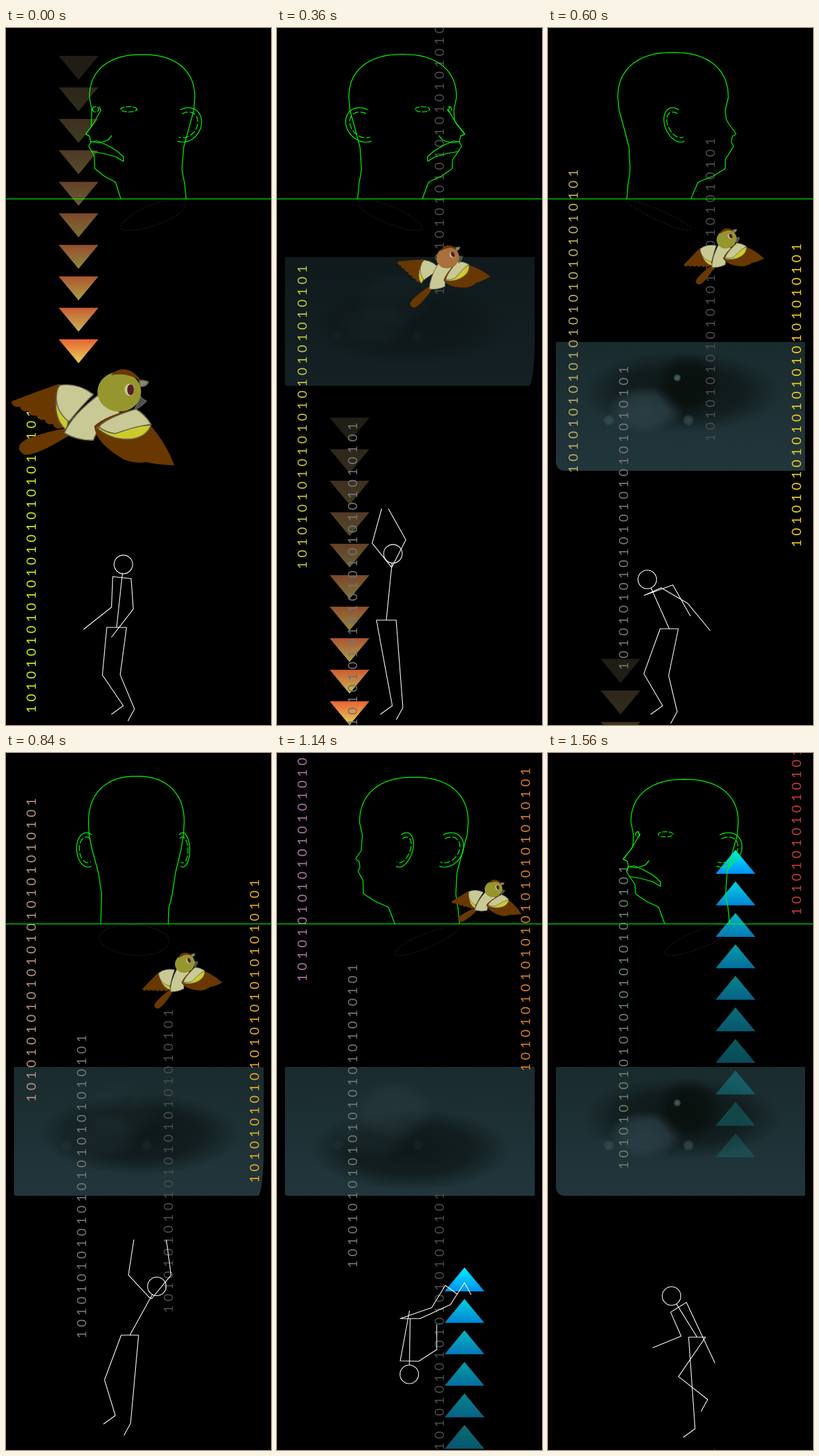
Animation of 400x1050 px, one loop 1.62 s. Source, as an HTML page with a canvas:

```html
<!DOCTYPE html>
<html lang="en">
<head>
<meta charset="utf-8">
<title>Turning head, bird and figure</title>
<style>
html, body { margin: 0; width: 100%; height: 100%; overflow: hidden; background: #000; }
canvas { display: block; }
</style>
</head>
<body>
<canvas id="stage" width="400" height="1050"></canvas>
<script>
const ctx = document.getElementById('stage').getContext('2d');
const STEP = 60, STEPS = 27, RAD = Math.PI / 180;

const mix = (a, b, f) => a + (b - a) * f;
const mixAll = (a, b, f) => a.map((v, i) => mix(v, b[i], f));
const clamp = (v, lo = 0, hi = 1) => Math.min(hi, Math.max(lo, v));
const rgb = c => `rgb(${c.map(Math.round)})`;

// Linear interpolation in rows of [position, ...values]
function lookup(rows, at) {
  let i = 0;
  while (i < rows.length - 2 && rows[i + 1][0] < at) i++;
  const a = rows[i], b = rows[i + 1];
  return mixAll(a, b, clamp((at - a[0]) / (b[0] - a[0]))).slice(1);
}

function line(points) {
  ctx.beginPath();
  points.forEach(([x, y]) => ctx.lineTo(x, y));
  ctx.stroke();
}

// ---- Head: a solid of elliptic slices turned about a vertical axis ----
const AXIS = 198, BROW = 105, NECK = 257;
const YAW = [[0, -48], [6, 56], [10, 112], [14, 173], [19, 240], [22, 280], [26, 305], [27, 312]];
// height, front, back, half width
const FACE = [[105, 75, -95, 72], [124, 70, -93, 71], [145, 73, -87, 67], [180, 72, -78, 58],
  [212, 72, -77, 53], [224, 50, -78, 52], [232, 27, -79, 51], [257, 15, -81, 51]];
// height, depth of the face's middle line
const PROFILE = [[112, 76], [124, 70], [145, 84], [160, 97], [163, 90], [172, 88], [178, 92],
  [185, 87], [192, 82], [203, 73], [212, 74]];

function drawHead(n) {
  const yaw = lookup(YAW, n)[0] * RAD, sin = Math.sin(yaw), cos = Math.cos(yaw);
  const depth = (out, z) => z * cos - out * sin;
  const project = ([out, y, z]) => [AXIS + (out * cos + z * sin) / (1 - depth(out, z) / 900), y];
  const stroke3d = (points, side = 1) => line(points.map(([o, y, z]) => project([o * side, y, z])));
  const ridge = y => [0, y, lookup(PROFILE, y)[0]];
  const top = 67 - 3 * cos;

  function slice(y) {
    if (y >= BROW) return lookup(FACE, y);
    const r = (1 - ((BROW - y) / top) ** 2.3) ** (1 / 2.3);
    return [-10 + 85 * r, -10 - 85 * r, 72 * r];
  }
  function edges(y) {
    const [front, back, w] = slice(y), mid = (front + back) / 2;
    const reach = Math.hypot((front - back) / 2 * sin, w * cos), x = AXIS + mid * sin;
    const nose = y >= 112 && y <= 212 ? project(ridge(y))[0] : x;
    return [Math.min(x - reach, nose), Math.max(x + reach, nose)];
  }

  const heights = [];
  for (let a = 90; a > 0; a -= 3) heights.push(BROW - top * Math.sin(a * RAD));
  for (let y = BROW; y <= NECK; y += 2) heights.push(y);
  const left = heights.map(y => [edges(y)[0], y]), right = heights.map(y => [edges(y)[1], y]);

  ctx.strokeStyle = '#0f0';
  ctx.lineWidth = 1.2;
  line([...left.reverse(), ...right]);

  for (const side of [1, -1]) {
    if (depth(side * 70, -35) > -45) drawEar(side);
    if (cos > 0.1 && depth(side * 38, 50) > -8) {
      const eye = [];
      for (let a = 0; a <= 360; a += 30) {
        const c = Math.cos(a * RAD);
        eye.push([38 + 13 * c, 122.5 - 4 * Math.sin(a * RAD), 50 - 4 * c]);
      }
      ctx.setLineDash([8, 2]);
      stroke3d(eye, side);
      ctx.setLineDash([]);
    }
    if (cos > 0.1 && depth(side * 30, 54) > 30) {
      stroke3d([[0, 172, 88], [8, 170, 84], [18, 176, 74], [26, 185, 62], [31, 194, 54], [31, 201, 54],
        [24, 194, 62], [14, 189, 76], [0, 186, 87]], side);
      stroke3d([[0, 171, 88], [8, 173, 80], [16, 169, 70], [20, 162, 66]], side);
    }
  }
  if (cos > 0.1) stroke3d([118, 124, 135, 145, 160, 163].map(ridge));

  function drawEar(side) {
    const ear = size => {
      const rim = [];
      for (let a = -120; a <= 110; a += 10) {
        const c = Math.cos(a * RAD), s = Math.sin(a * RAD);
        rim.push([70 + 11 * c * size, 146 + 26 * s * size, -32 - 22 * c * size + 6 * s]);
      }
      return rim;
    };
    stroke3d(ear(1), side);
    ctx.setLineDash([9, 3]);
    stroke3d(ear(0.75), side);
    ctx.setLineDash([]);
  }

  // Faint cut edge of the neck, lower in front
  const ring = [];
  for (let a = 0; a <= 360; a += 10) {
    const s = Math.sin(a * RAD);
    ring.push([51 * Math.cos(a * RAD), 282 + 23 * s, -33 + 48 * s]);
  }
  ctx.strokeStyle = '#303830';
  ctx.setLineDash([1, 3]);
  stroke3d(ring);
  ctx.setLineDash([]);
}

// ---- Stick figure: joints bent between key points ----
// step, then x and y of neck, pelvis, left hand, right hand, left ankle, right ankle
const POSES = [
  [0, 175, 828, 167, 903, 117, 906, 159, 918, 177, 1021, 194, 1026],
  [6, 173, 812, 165, 892, 158, 724, 168, 724, 174, 1021, 190, 1024],
  [10, 158, 849, 183, 905, 215, 886, 245, 908, 173, 1021, 195, 1030],
  [14, 218, 821, 187, 877, 193, 733, 242, 733, 165, 998, 188, 1010],
  [19, 200, 916, 201, 852, 200, 840, 241, 861, 254, 802, 283, 798],
  [22, 194, 927, 253, 906, 192, 907, 204, 968, 238, 987, 291, 1013],
  [26, 197, 835, 225, 880, 158, 896, 252, 919, 222, 1018, 241, 974]
];
POSES.push([STEPS, ...POSES[0].slice(1)]);

// Middle joint of a two-bone limb
function bend([ax, ay], [bx, by], upper, lower, side) {
  const dx = bx - ax, dy = by - ay, d = Math.hypot(dx, dy) || 1;
  const k = Math.max(1, d / (upper + lower)), u = upper * k, l = lower * k;
  const along = (u * u - l * l + d * d) / (2 * d);
  const off = side * Math.sqrt(Math.max(0, u * u - along * along));
  return [ax + (dx * along - dy * off) / d, ay + (dy * along + dx * off) / d];
}

function drawFigure(n) {
  const v = lookup(POSES, n);
  const [neck, pelvis, handL, handR, ankleL, ankleR] = [0, 2, 4, 6, 8, 10].map(i => [v[i], v[i + 1]]);
  const sx = neck[0] - pelvis[0], sy = neck[1] - pelvis[1], length = Math.hypot(sx, sy);
  const ux = sx / length, uy = sy / length, up = -uy;
  const size = 1 + 0.3 * Math.min(0, up);

  const raised = ((handL[0] + handR[0]) / 2 - neck[0]) * ux + ((handL[1] + handR[1]) / 2 - neck[1]) * uy;
  const half = 14 * (1 - clamp(raised / 90)), flip = up < -0.5 ? -1 : 1;
  const shoulder = s => [neck[0] - uy * half * s * flip, neck[1] + ux * half * s * flip];
  const hip = s => [pelvis[0] + 15 * Math.abs(up) * s, pelvis[1]];
  const arm = (s, hand) => {
    const from = shoulder(s), dy = hand[1] - from[1];
    const k = Math.min(size, Math.hypot(hand[0] - from[0], dy) / 70);
    return [from, bend(from, hand, 46 * k, 54 * k, s > 0 && dy < 0 ? 1 : -1), hand];
  };
  const leg = (s, ankle, tx, ty) => {
    const from = hip(s), toe = [ankle[0] + tx * clamp(3 * up + 2, -1, 1), ankle[1] + ty];
    return [from, bend(from, ankle, 72 * size, 56 * size, 1), ankle, toe];
  };
  const head = [neck[0] + ux * 20, neck[1] + uy * 20];

  ctx.strokeStyle = '#fff';
  ctx.lineWidth = 1.1;
  line([...arm(-1, handL).reverse(), neck, ...arm(1, handR)]);
  line([...leg(-1, ankleL, -18, 13).reverse(), ...leg(1, ankleR, -10, 18)]);
  line([[neck[0] + ux * 6, neck[1] + uy * 6], pelvis]);
  ctx.beginPath();
  ctx.arc(...head, 14, 0, 7);
  ctx.stroke();
}

// ---- Bird ----
const BROWN = '#693800', CREAM = '#c9c996', YELLOW = '#cccb2c', OLIVE = '#96962f', EDGE = '#66614a';

// Start point followed by control and end points of quadratic curves
function shape(fill, x, y, ...q) {
  ctx.beginPath();
  ctx.moveTo(x, y);
  for (let i = 0; i < q.length; i += 4) ctx.quadraticCurveTo(q[i], q[i + 1], q[i + 2], q[i + 3]);
  ctx.closePath();
  ctx.fillStyle = fill;
  ctx.fill();
  ctx.strokeStyle = fill === BROWN ? BROWN : EDGE;
  ctx.stroke();
}
function oval(fill, x, y, rx, ry) {
  ctx.beginPath();
  ctx.ellipse(x, y, rx, ry, 0, 0, 7);
  ctx.fillStyle = fill;
  ctx.fill();
}
function feathers(x0, y0, x1, y1, count) {
  const q = [];
  for (let i = 1; i <= count; i++) {
    const x = mix(x0, x1, i / count), y = mix(y0, y1, i / count);
    q.push(x - 10, y + 3, x, y);
  }
  return q;
}
function turned(x, y, degrees, paint) {
  ctx.save();
  ctx.translate(x, y);
  ctx.rotate(degrees * RAD);
  ctx.translate(-x, -y);
  paint();
  ctx.restore();
}

function drawBird(n) {
  const glide = Math.max(0, 1 - n / 12) ** 3, leave = Math.max(0, n - 14);
  const scale = 0.46 + 0.54 * glide - 0.0105 * leave;
  const flap = clamp(1 - Math.abs(n - 6) / 3);
  ctx.save();
  ctx.translate(271 - 96 * glide + 6 * leave ** 1.4, 315 + 230 * glide - 22.3 * leave);
  ctx.rotate((-26 + 26 * glide + 2.9 * leave) * RAD);
  ctx.scale(scale, scale);
  ctx.translate(-175, -545);
  ctx.lineWidth = 1.6;
  shape(BROWN, 97, 603, 60, 608, 30, 621, 12, 632, 28, 642, 45, 644, 95, 613);
  turned(108, 570, 38 * flap, () => {
    shape(BROWN, 80, 537, 45, 549, 9, 563, ...feathers(9, 563, 84, 602, 6), 104, 590, 110, 565);
    shape(YELLOW, 76, 558, 72, 588, 90, 605, 96, 595, 92, 585);
    shape(CREAM, 82, 538, 108, 534, 132, 552, 115, 568, 95, 593, 78, 580, 76, 560, 76, 542, 82, 538);
  });
  shape(CREAM, 142, 551, 160, 556, 172, 581, 140, 596, 132, 621, 108, 622, 88, 610, 100, 582, 142, 551);
  turned(160, 590, -8 * flap, () => {
    shape(BROWN, 134, 600, 136, 625, 178, 649, 195, 656, 212, 653, 225, 657, 253, 658, 235, 610, 192, 575, 150, 585, 134, 600);
    shape(YELLOW, 137, 602, 160, 622, 190, 619, 212, 616, 219, 598, 170, 602, 137, 602);
    shape(CREAM, 140, 601, 150, 588, 196, 574, 210, 582, 219, 597, 195, 600, 165, 611, 152, 610, 140, 601);
  });
  shape('#4a5358', 203, 555, 206, 560, 212, 562, 205, 570, 194, 575);
  shape('#89866c', 201, 530, 210, 531, 215, 533, 212, 541, 202, 540);
  oval(flap > 0.5 ? '#a8703c' : OLIVE, 171, 548, 33, 30);
  shape(BROWN, 160, 522, 182, 504, 203, 531, 185, 518, 160, 522);
  oval(CREAM, 186, 545, 7, 9);
  oval('#581c2a', 188, 545, 5, 8);
  ctx.restore();
}

// ---- Triangles: the last of the row leads and is brightest ----
function drawTriangles(x, y, dir, dim, base, tip) {
  for (let i = 0; i < 10; i++) {
    const f = i / 9, flat = y + dir * 47.45 * i, end = flat + dir * 36;
    const g = ctx.createLinearGradient(0, flat, 0, end);
    g.addColorStop(0, rgb(mixAll(dim, base, f)));
    g.addColorStop(1, rgb(mixAll(dim, tip, f)));
    ctx.globalAlpha = 0.25 + 0.75 * f;
    ctx.fillStyle = g;
    ctx.beginPath();
    ctx.moveTo(x - 30, flat);
    ctx.lineTo(x + 30, flat);
    ctx.lineTo(x, end);
    ctx.fill();
  }
  ctx.globalAlpha = 1;
}

// ---- Columns of digits, read upwards ----
const DIGITS = [...'10'.repeat(13) + '1'], PITCH = 17.15;
const COLUMNS = [
  { x: 38, bottom: 1032, speed: -36.18, from: 0, to: 24, a: [205, 235, 20], b: [160, 80, 200] },
  { x: 114, bottom: 1179.5, speed: -21.25, from: 3, to: 26, a: [118, 112, 120], b: [104, 124, 110] },
  { x: 245, bottom: 72, speed: 55.1, from: 2, to: 26, a: [76, 74, 78], b: [66, 76, 68] },
  { x: 375, bottom: 1118, speed: -33.6, from: 8, to: 26, a: [245, 220, 30], b: [190, 60, 55] }
];
function drawColumn({ x, bottom, speed, from, to, a, b }, n) {
  if (n < from || n > to) return;
  ctx.save();
  ctx.translate(x + 7, bottom + speed * n);
  ctx.rotate(-Math.PI / 2);
  ctx.font = '20px Lato, sans-serif';
  ctx.fillStyle = rgb(mixAll(a, b, (n - from) / (to - from)));
  DIGITS.forEach((d, i) => ctx.fillText(d, i * PITCH, 0));
  ctx.restore();
}

// ---- Eye panel ----
function glow(x, y, rx, ry, color, alpha) {
  ctx.save();
  ctx.translate(x, y);
  ctx.scale(rx, ry);
  const g = ctx.createRadialGradient(0, 0, 0, 0, 0, 1);
  g.addColorStop(0, `rgba(${color},${alpha})`);
  g.addColorStop(0.6, `rgba(${color},${alpha * 0.8})`);
  g.addColorStop(1, `rgba(${color},0)`);
  ctx.fillStyle = g;
  ctx.fillRect(-1, -1, 2, 2);
  ctx.restore();
}
function drawEye(n) {
  const open = n < 10 ? clamp(0.5 + (n - 6) / 8, 0.5) : clamp(Math.abs(n - 18.2) / 8);
  const wide = clamp(open * 2 - 1), lid = 1 - open;
  ctx.save();
  ctx.translate(12, Math.min(473, -197.4 + 90.4 * n));
  ctx.beginPath();
  if (wide > 0.5) ctx.roundRect(0, 0, 376, 194, [0, 0, 0, 13]);
  else ctx.roundRect(0, 0, 377, 194, [0, 0, open > 0.2 ? { x: 9, y: 70 } : 0, 4]);
  ctx.clip();
  ctx.globalAlpha = n < 7 ? 0.6 : 1;
  const g = ctx.createLinearGradient(0, 0, 0, 194);
  g.addColorStop(0, '#1a2b2e');
  g.addColorStop(1, '#21363c');
  ctx.fillStyle = g;
  ctx.fillRect(0, 0, 390, 196);
  glow(190, 75 + 55 * lid, 150, 62, '9,16,15', 0.75);
  glow(135, 102, 58, 36, '48,70,78', 0.2 + 0.6 * wide);
  glow(165, 65, 60, 45, '42,60,64', 0.5 * clamp(lid * 2 - 0.6));
  glow(200, 64, 50, 48, '9,16,14', wide);
  for (const [x, y] of [[80, 118], [200, 118]]) glow(x, y, 9, 9, '58,80,84', 0.6 * wide + 0.15);
  glow(183, 54, 6, 6, '70,95,100', wide);
  ctx.restore();
}

function draw(n) {
  ctx.fillStyle = '#000';
  ctx.fillRect(0, 0, 400, 1050);
  ctx.lineJoin = 'round';
  drawEye(n);
  drawTriangles(109.5, 42 + 90.85 * n, 1, [130, 120, 80], [232, 98, 52], [225, 212, 88]);
  drawTriangles(283, 1238 - 89.85 * (n - 19), -1, [25, 150, 150], [0, 144, 242], [0, 240, 255]);
  COLUMNS.forEach(c => drawColumn(c, n));
  ctx.fillStyle = '#0f0';
  ctx.fillRect(0, 257, 400, 1);
  drawHead(n);
  drawBird(n);
  drawFigure(n);
}

const start = performance.now();
function tick() {
  const t = Math.max(0, performance.now() - start);
  draw(Math.floor(t / STEP) % STEPS);
  requestAnimationFrame(tick);
}
tick();
</script>
</body>
</html>
```
